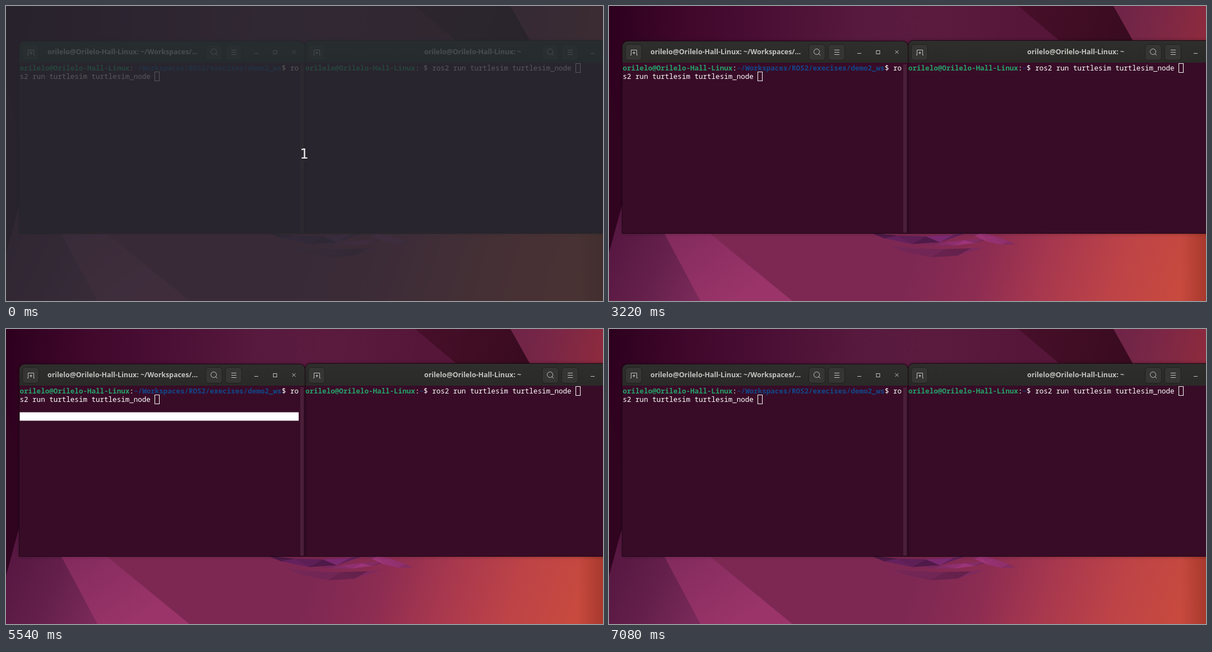
Recreate the animation shown at these times as an HTML page with a canvas. Size 1065 by 526 pixels, loop 8 s.

```html
<!DOCTYPE html>
<html lang="en">
<head>
<meta charset="utf-8">
<title>Two terminals</title>
<style>
html, body { margin: 0; width: 100%; height: 100%; overflow: hidden; background: #2d0020; }
canvas { display: block; width: 1065px; height: 526px; }
</style>
</head>
<body>
<canvas id="stage" width="1065" height="526"></canvas>
<script>
const W = 1065, H = 526, LOOP = 8000;
const FLOOR = 405, HEADER = 101;
const ctx = document.getElementById('stage').getContext('2d');

const MONO = '12.567px "Noto Sans Mono", monospace';
const TITLE = 'bold 12.4px "Noto Sans", sans-serif';
const CELL = 7.54, ROW = 15;
const GREEN = '#26a269', BLUE = '#12488b', WHITE = '#ffffff', ICON = '#c3c3bf';
const USER = 'orilelo@Orilelo-Hall-Linux';
const COMMAND = '$ ros2 run turtlesim turtlesim_node ';

function seeded(seed) {
  return () => (seed = (seed * 16807) % 2147483647) / 2147483647;
}

function gradient(x0, y0, x1, y1, ...colors) {
  const g = ctx.createLinearGradient(x0, y0, x1, y1);
  colors.forEach((c, i) => g.addColorStop(i / (colors.length - 1), c));
  return g;
}

function path(...pts) {
  ctx.beginPath();
  for (let i = 0; i < pts.length; i += 2) ctx.lineTo(pts[i], pts[i + 1]);
}

function poly(fill, ...pts) {
  path(...pts);
  ctx.fillStyle = fill;
  ctx.fill();
}

function line(...pts) {
  path(...pts);
  ctx.stroke();
}

function rect(fill, x, y, w, h) {
  ctx.fillStyle = fill;
  ctx.fillRect(x, y, w, h);
}

function text(str, x, y, font, fill) {
  ctx.font = font;
  ctx.fillStyle = fill;
  ctx.fillText(str, x, y);
}

// A tapering strip of triangles along a sagging curve.
function ribbon(x0, y0, x1, y1, sag, width, hue, light, rnd) {
  const steps = 7;
  const point = i => {
    const k = i / steps, bow = 4 * k * (1 - k);
    const side = i % 2 ? .5 : -.5;
    return [x0 + (x1 - x0) * k, y0 + (y1 - y0) * k + bow * (sag + side * width)];
  };
  for (let i = 0; i < steps - 1; i++) {
    const shade = light + (rnd() - .5) * 14;
    poly(`hsl(${hue} 50% ${shade}%)`, ...point(i), ...point(i + 1), ...point(i + 2));
  }
}

function wallpaper() {
  rect(gradient(0, 0, 740, 40, '#2d001e', '#41082c', '#4c0f35', '#571a3e', '#5b1b3f', '#561639'), 0, 0, W, H);
  poly(gradient(730, 0, 920, 62, '#480f2a', '#390b20'), 730, 0, 900, 0, 936, 64, 806, 64);
  poly(gradient(900, 0, W, 40, '#6d2448', '#7b2746', '#8d2a3e'), 900, 0, W, 0, W, 64, 936, 64);

  // left edge
  poly('#30041f', 0, 136, 26, 250, 26, 345, 0, 440);
  poly(gradient(0, 420, 170, 500, '#561741', '#64204b', '#7b2a5a'), 0, 440, 26, 345, 340, 345, 340, H, 0, H);

  // lower part
  poly(gradient(560, 400, 1010, 540, '#7d2853', '#8c2c52', '#a8384e', '#bd4347', '#c84a3e'),
       178, 404, W, 404, W, H, 327, H);
  poly(gradient(130, 400, 220, H, '#842b5e', '#9a3469'), 98, 404, 178, 404, 327, H, 163, H);
  rect(gradient(1020, 0, W, 0, 'rgba(120,30,20,0)', 'rgba(120,30,20,.4)'), 1020, 404, 45, 122);

  const rnd = seeded(11);
  ribbon(466, 404, 640, 404, 14, 14, 307, 27, rnd);
  ribbon(502, 428, 670, 430, 12, 15, 322, 30, rnd);
  ribbon(560, 425, 690, 412, 4, 8, 320, 36, rnd);
  ribbon(640, 402, 725, 425, 2, 14, 322, 38, rnd);
}

function button(x, y) {
  ctx.beginPath();
  ctx.roundRect(x + .5, y + .5, 29, 28, 5);
  ctx.fillStyle = '#353533';
  ctx.fill();
  ctx.strokeStyle = '#20201f';
  ctx.stroke();
  ctx.strokeStyle = ICON;
}

function tabButton(x, y) {
  button(x, y);
  line(x + 9, y + 19.5, x + 10.5, y + 19.5, x + 10.5, y + 10.5, x + 20.5, y + 10.5, x + 20.5, y + 19.5, x + 22, y + 19.5);
  line(x + 13, y + 15.5, x + 18, y + 15.5);
  line(x + 15.5, y + 13, x + 15.5, y + 18);
}

function searchButton(x, y) {
  button(x, y);
  ctx.beginPath();
  ctx.arc(x + 14.5, y + 13.5, 5, 0, 7);
  ctx.stroke();
  line(x + 18, y + 17, x + 21, y + 20);
}

function menuButton(x, y) {
  button(x, y);
  for (let dy = 10.5; dy < 20; dy += 4) line(x + 11, y + dy, x + 20, y + dy);
}

// Minimise, maximise and close, evenly spaced.
function windowControls(x, y) {
  const gap = 33.5;
  line(x - 3.5, y + 2.5, x + 3.5, y + 2.5);
  ctx.strokeRect(x + gap - 3, y - 2.5, 6, 6);
  const c = x + 2 * gap;
  line(c - 3, y - 3, c + 3, y + 3);
  line(c + 3, y - 3, c - 3, y + 3);
}

function terminal(x, y, w, titleX, title) {
  ctx.save();
  ctx.shadowColor = 'rgba(0,0,0,.4)';
  ctx.shadowBlur = 7;
  ctx.beginPath();
  ctx.roundRect(x, y, w, FLOOR - y, [9, 9, 0, 0]);
  ctx.fillStyle = '#380c27';
  ctx.fill();
  ctx.shadowColor = 'transparent';
  ctx.clip();
  rect(gradient(0, y, 0, HEADER, '#2e2e2c', '#2a2a28'), x, y, w, HEADER - y);
  ctx.restore();

  ctx.strokeStyle = '#1c0714';
  ctx.beginPath();
  ctx.roundRect(x - .5, y - .5, w + 1, FLOOR - y + 1, [9, 9, 0, 0]);
  ctx.stroke();

  const top = 68, tools = x + w - 177;
  tabButton(x + 5, top);
  searchButton(tools, top);
  menuButton(tools + 35, top);
  windowControls(tools + 90.5, top + 14);
  text(title, titleX, 86, TITLE, ICON);
}

// Types a prompt and command on the character grid, wrapping at the last column.
function shell(x, y, columns, dir) {
  let col = 0, row = 0;
  const write = (str, color, weight) => {
    while (str) {
      const part = str.slice(0, columns - col);
      text(part, x + col * CELL, y + row * ROW, weight + ' ' + MONO, color);
      str = str.slice(part.length);
      col += part.length;
      if (col === columns) { col = 0; row++; }
    }
  };
  write(USER, GREEN, 'bold');
  write(':', WHITE, 'normal');
  write(dir, BLUE, 'bold');
  write(COMMAND, WHITE, 'normal');
  ctx.strokeStyle = WHITE;
  ctx.strokeRect(Math.floor(x + col * CELL) + .5, y + row * ROW - 12.5, 8, 16);
}

function draw(t) {
  wallpaper();
  terminal(534, 62, 599, 746, USER + ': ~');
  shell(534, 115, 70, '~');
  terminal(24, 63, 509, 74, USER + ': ~/Workspaces/…');
  rect('#4a2039', 525, 104, 6, 300);
  shell(24.5, 115, 66, '~/Workspaces/ROS2/execises/demo2_ws');

  if (t >= 5300 && t < 5700) rect(WHITE, 24.5, 148.5, 66 * CELL, ROW);
  if (t < 100) {
    rect('rgba(38,44,48,.78)', 0, 0, W, H);
    text('1', 524.5, 272, '24px "DejaVu Sans", sans-serif', '#f0f0f0');
  }
}

const start = performance.now();
function tick() {
  draw((performance.now() - start) % LOOP);
  requestAnimationFrame(tick);
}
tick();
</script>
</body>
</html>
```
